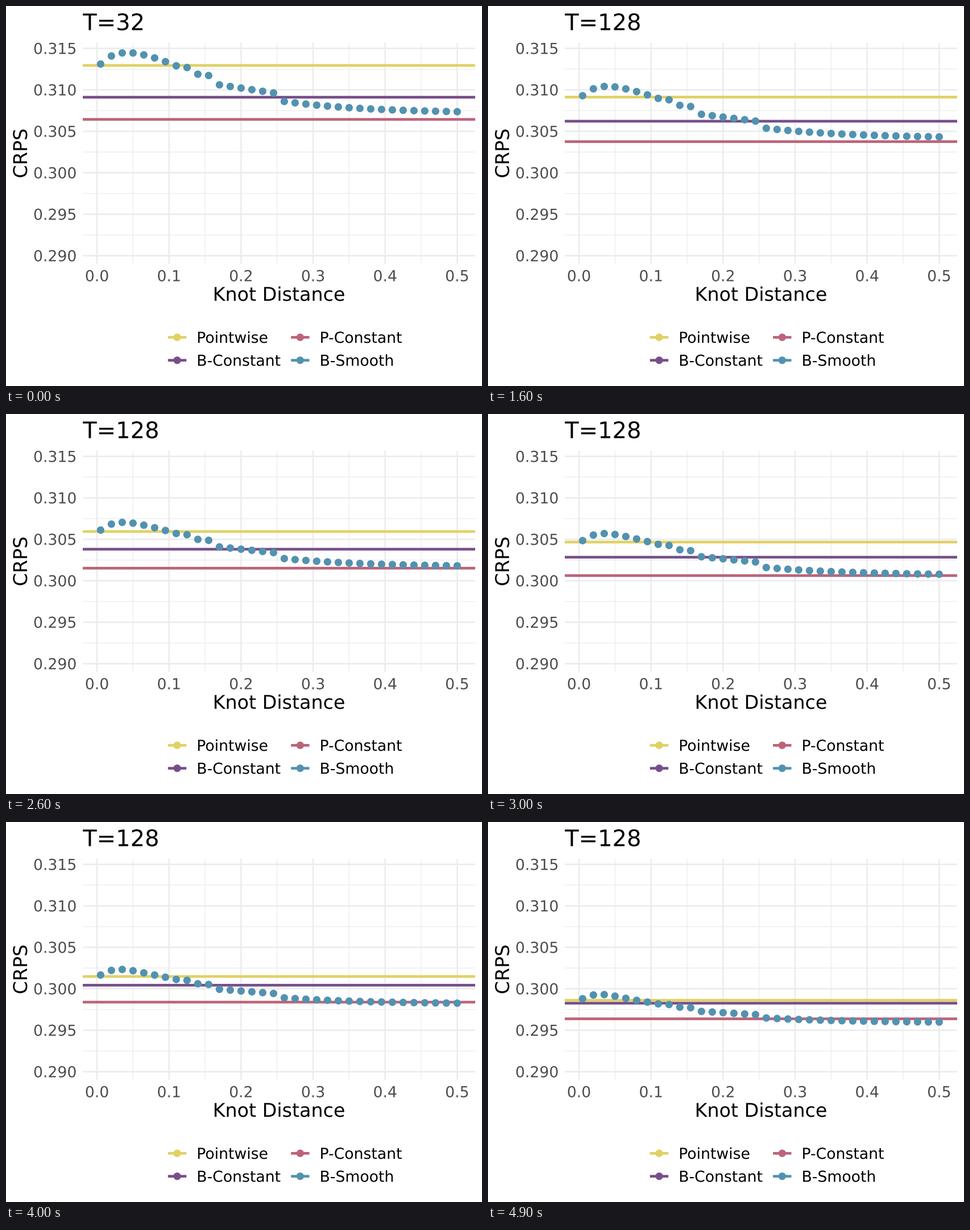
A matplotlib script that plays this animation: 837 px wide and 669 px high, repeating every 8 s.

```python
import numpy as np
import matplotlib.pyplot as plt
from matplotlib.animation import FuncAnimation
from matplotlib.patches import PathPatch
from matplotlib.textpath import TextPath
from matplotlib.transforms import Affine2D

plt.rcParams["font.family"] = "DejaVu Sans"

W, H, DPI = 837, 669, 64
PT = 72 / DPI  # points per pixel

LEFT, RIGHT, TOP, BOTTOM = 135, 825, 65.3, 454.2
YELLOW, PURPLE, RED, BLUE = "#E1D164", "#774E8A", "#BC6478", "#5292B0"
GRID, TICK = "#EBEBEB", "#4D4D4D"
DOT, LINE = 13.2, 4.7
SMALL, MEDIUM, LARGE = 26.67, 33.33, 40

HOLD, STEPS = 4, 45  # frames before the move, frames of the move

# Heights in pixels at the start and the end of the move
LEVELS = [(YELLOW, 104.6, 313.8), (PURPLE, 160.6, 319), (RED, 199.6, 346.5)]


def px(x):
    return 160 + 1266.7 * x


def py(y):
    return 74.6 + 14600 * (0.315 - y)


def smooth_start(i):
    """Early hump, then short steps, then a slow decay."""
    hump = 102.2 + 8.5 * i - 58.2 * (1 - 0.61 ** i)
    tail = 168 + 20.9 * (1 - np.exp((17 - i) / 8))
    return np.select(
        [i < 8, i < 9, i < 11, i < 17],
        [hump, 108.3, 120 + 2.4 * (i - 9), 138.8 + 2.84 * (i - 11)], tail)


def smooth_end(i):
    """The start curve, flattened, with a lower hump."""
    hump = 8.8 * np.exp(-((i - 0.9) / 2.6) ** 2)
    return 326 + 0.396 * (smooth_start(i) - 120) - hump


fig = plt.figure(figsize=(W / DPI, H / DPI), dpi=DPI, facecolor="white")
ax = fig.add_axes([0, 0, 1, 1])
ax.set_xlim(0, W)
ax.set_ylim(H, 0)
ax.axis("off")


def line(xs, ys, color, width, z):
    return ax.plot(xs, ys, color=color, lw=width * PT, zorder=z,
                   solid_capstyle="butt", snap=False)[0]


def dots(xs, ys, color):
    return ax.scatter(xs, ys, s=(DOT * PT) ** 2, c=color, edgecolors="none",
                      linewidths=0, zorder=4)


def label(x, y, text, size, color="black", angle=0):
    """Text with its baseline starting at x, y."""
    place = Affine2D().scale(1, -1).rotate_deg(-angle).translate(x, y)
    path = TextPath((0, 0), text, size=size).transformed(place)
    return ax.add_patch(PathPatch(path, fc=color, lw=0, snap=False, zorder=5))


def grid(xs, ys, width, z):
    for x in xs:
        line([px(x)] * 2, [TOP, BOTTOM], GRID, width, z)
    for y in ys:
        line([LEFT, RIGHT], [py(y)] * 2, GRID, width, z)


x_ticks = np.arange(6) / 10
y_ticks = 0.29 + 0.005 * np.arange(6)
grid(x_ticks[:-1] + 0.05, y_ticks[:-1] + 0.0025, 1.2, 1)
grid(x_ticks, y_ticks, 2.4, 2)

for x in x_ticks:
    label(px(x) - 21.2, 484.5, f"{x:.1f}", SMALL, TICK)
for y in y_ticks:
    label(48, py(y) + 9.8, f"{y:.3f}", SMALL, TICK)

label(363.6, 519, "Knot Distance", MEDIUM)
label(37, 303.3, "CRPS", MEDIUM, angle=90)
titles = [label(135.2, 42.5, text, LARGE) for text in ("T=32", "T=128")]

for x, y, name, color in [(301, 583.3, "Pointwise", YELLOW),
                          (301, 623.7, "B-Constant", PURPLE),
                          (517.3, 583.3, "P-Constant", RED),
                          (517.3, 623.7, "B-Smooth", BLUE)]:
    line([x - 16.2, x + 16.2], [y, y], color, LINE, 3)
    dots([x], [y], color)
    label(x + 34.2, y + 9.7, name, SMALL)

levels = [line([LEFT, RIGHT], [y, y], color, LINE, 3) for color, y, _ in LEVELS]
index = np.arange(34)
knots = px(0.005 + 0.015 * index)
first, last = smooth_start(index), smooth_end(index)
smooth = dots(knots, first, BLUE)


def update(i):
    t = min(max(i - HOLD, 0), STEPS) / STEPS
    titles[0].set_visible(t == 0)
    titles[1].set_visible(t > 0)
    for item, (_, start, end) in zip(levels, LEVELS):
        item.set_ydata([start + (end - start) * t] * 2)
    smooth.set_offsets(np.column_stack([knots, first + (last - first) * t]))
    return [*titles, smooth, *levels]


anim = FuncAnimation(fig, update, frames=80, interval=100, repeat=True,
                     repeat_delay=0, blit=False)
plt.show()
```
